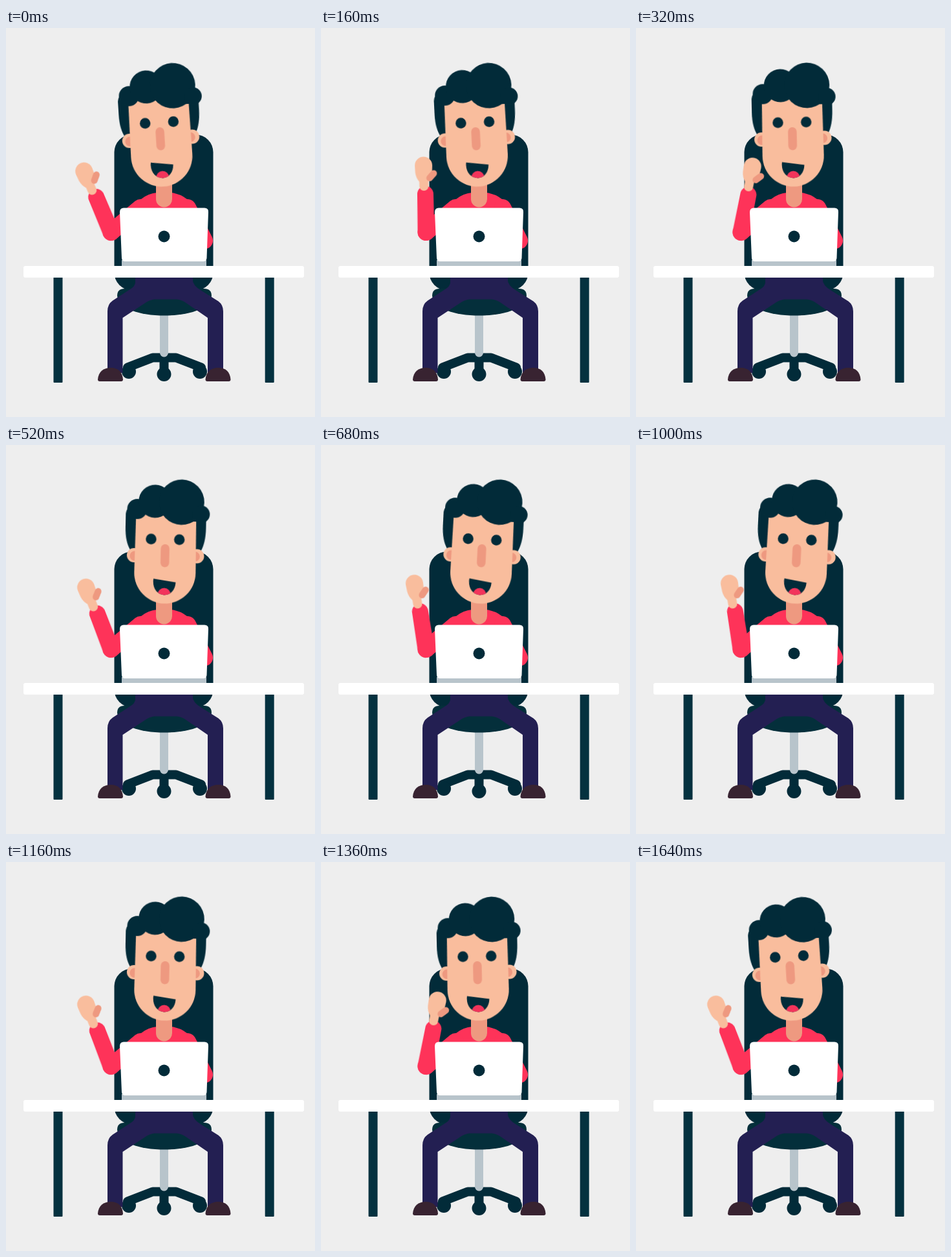
Recreate the animation shown at these times as an HTML page. Size 478x600 px, loop 1.68 s.

```html
<!DOCTYPE html>
<html lang="en">
<head>
<meta charset="utf-8">
<title>Waving at the desk</title>
<style>
  html, body { margin: 0; width: 100%; height: 100%; overflow: hidden; background: #eee; }
  svg { display: block; width: 100vw; height: 100vh; }
  .dark { fill: #022b39; }
  .seat { fill: #042f3b; }
  .desk { fill: #04313f; }
  .metal { fill: #b8c4cb; }
  .navy { fill: #231f52; }
  .shoe { fill: #382331; }
  .red { fill: #fe3359; }
  .skin { fill: #f9bd9d; }
  .shade { fill: #ee9980; }
  .limb { fill: none; stroke: #fe3359; stroke-width: 26; stroke-linecap: round; }
  #head { transform-origin: 244px 257px; }
  #arm { transform-origin: 162.5px 315px; }
  .eye { transform-box: fill-box; transform-origin: center; }
</style>
</head>
<body>
<svg viewBox="0 0 478 600">
  <rect width="478" height="600" fill="#eee"/>

  <!-- chair -->
  <path d="M188 523.500L227 508.500H263L302 523.500" fill="none" stroke="#022b39" stroke-width="14" stroke-linejoin="round" stroke-linecap="round"/>
  <rect class="dark" x="237.500" y="503" width="14" height="28"/>
  <rect class="metal" x="238" y="430" width="13" height="77.500" rx="6.500"/>
  <g class="dark">
    <circle cx="190" cy="530" r="11"/>
    <circle cx="244.500" cy="534" r="11"/>
    <circle cx="300" cy="530" r="11"/>
    <rect x="167.500" y="164.500" width="153" height="240" rx="27"/>
  </g>
  <path class="seat" d="M172 413Q172 402 184 402H306Q318 402 318 413C316 433 284 443.500 245 443.500S174 433 172 413Z"/>

  <!-- legs -->
  <path class="navy" d="M200 380V393Q199 399 192 403L165 420.500Q157 426 157 437V532H180.500V447L217 423Q223 419 230 418.500H264Q271 419 277 423L312 447V532H336V437Q336 427 328.500 421.500L299 403Q290 397 289 390V380Z"/>
  <path id="shoe" class="shoe" d="M142 542C143 530 151 524 162 524S180 530 181 542Q181 545 178 545H145Q142 545 142 542Z"/>
  <use href="#shoe" x="166.500"/>

  <!-- body -->
  <path class="red" d="M200 350V270Q203 266 209 264Q220 255 234 254H256Q270 256 280 264Q286 266 289 270V350Z"/>
  <path class="limb" d="M208 277L162.500 315M281 277L307 328"/>
  <path class="shade" d="M232 230H257V264A12.500 12.500 0 0 1 232 264Z"/>

  <g id="head">
    <path class="dark hair" d="M182 108Q182 100 192 98H300Q306.500 100 306.500 110V128C306.500 143 304 155 299 164H190C185 155 182 145 182 128Z"/>
    <g class="skin">
      <circle cx="196" cy="171" r="11"/>
      <circle cx="293.500" cy="170.500" r="11"/>
    </g>
    <g class="shade">
      <circle cx="197" cy="172" r="7.500"/>
      <circle cx="290.500" cy="171" r="7.500"/>
    </g>
    <path class="skin" d="M198 104H291L292 197A47.500 47.500 0 0 1 197 197Z"/>
    <g class="dark hair">
      <circle cx="199.500" cy="100.500" r="15.500"/>
      <circle cx="227" cy="88" r="25.500"/>
      <circle cx="268" cy="88.500" r="35"/>
      <circle cx="298.500" cy="106.500" r="13.500"/>
      <rect x="286" y="95" width="14" height="23"/>
    </g>
    <g class="dark">
      <circle class="eye" cx="222" cy="145.500" r="8.200"/>
      <circle class="eye" cx="265.700" cy="145.500" r="8.200"/>
    </g>
    <rect class="shade" x="237.300" y="153" width="13.400" height="35.500" rx="6.700"/>
    <clipPath id="lips"><path id="mouth" d="M227 206.500L261.500 211.500C261 223 254 231.500 244 231.500C233 231 225 221 227 206.500Z"/></clipPath>
    <use href="#mouth" class="dark"/>
    <circle cx="244" cy="230.500" r="10" fill="#f2345b" clip-path="url(#lips)"/>
  </g>

  <g id="arm">
    <g transform="translate(162.500 315)">
      <path class="red" d="M-13 0L-12.500 -59A12.500 12.500 0 0 1 12.500 -59L13 0A13 13 0 0 1 -13 0Z"/>
      <path class="skin" d="M-15.500 -103A13.500 13.500 0 0 1 11.500 -103L11 -92Q6 -86 5 -78V-71A7 7 0 0 1 -9 -71V-78Q-14 -84 -15 -92Z"/>
      <path d="M13.500 -90.500L7 -83.500" stroke="#ee9980" stroke-width="10" stroke-linecap="round"/>
    </g>
  </g>

  <!-- desk -->
  <g class="desk">
    <rect x="73.500" y="380" width="14" height="167" rx="1"/>
    <rect x="400.700" y="380" width="14" height="167" rx="1"/>
  </g>
  <rect class="metal" x="179" y="358" width="131" height="10"/>
  <path fill="#fff" d="M182 277.500H307Q313.500 277.500 313 284L310.500 355Q310 360 305 360H184Q179.500 360 179 355L176 284Q176 277.500 182 277.500Z"/>
  <circle class="dark" cx="244.500" cy="321.500" r="9"/>
  <rect x="27" y="367" width="434" height="18" rx="3" fill="#fff"/>
</svg>
<script>
  const LOOP = 1680, STEP = 40, COUNT = LOOP / STEP;

  // Cosine swing from a to b and back once per period
  const swing = (t, period, a, b) =>
    a + (b - a) * (1 - Math.cos(2 * Math.PI * t / period)) / 2;

  // Hold each pose for one step
  function play(selector, pose) {
    const frames = Array.from({ length: COUNT + 1 }, (_, i) => ({
      offset: i / COUNT,
      transform: pose(i * STEP),
      easing: 'step-end'
    }));
    for (const el of document.querySelectorAll(selector))
      el.animate(frames, { duration: LOOP, iterations: Infinity });
  }

  const blink = t => Math.min(1, 0.1 + Math.abs(t - LOOP / 2) * 0.0095);

  play('#head', t => `rotate(${swing(t, LOOP, -3.5, 3.5)}deg)`);
  play('.hair', t => `translateY(${swing(t, LOOP, 1.6, -2)}px)`);
  play('#arm', t => `rotate(${swing(t, LOOP / 3, -22.8, 12.8)}deg)`);
  play('.eye', t => `scaleY(${blink(t)})`);
</script>
</body>
</html>
```
